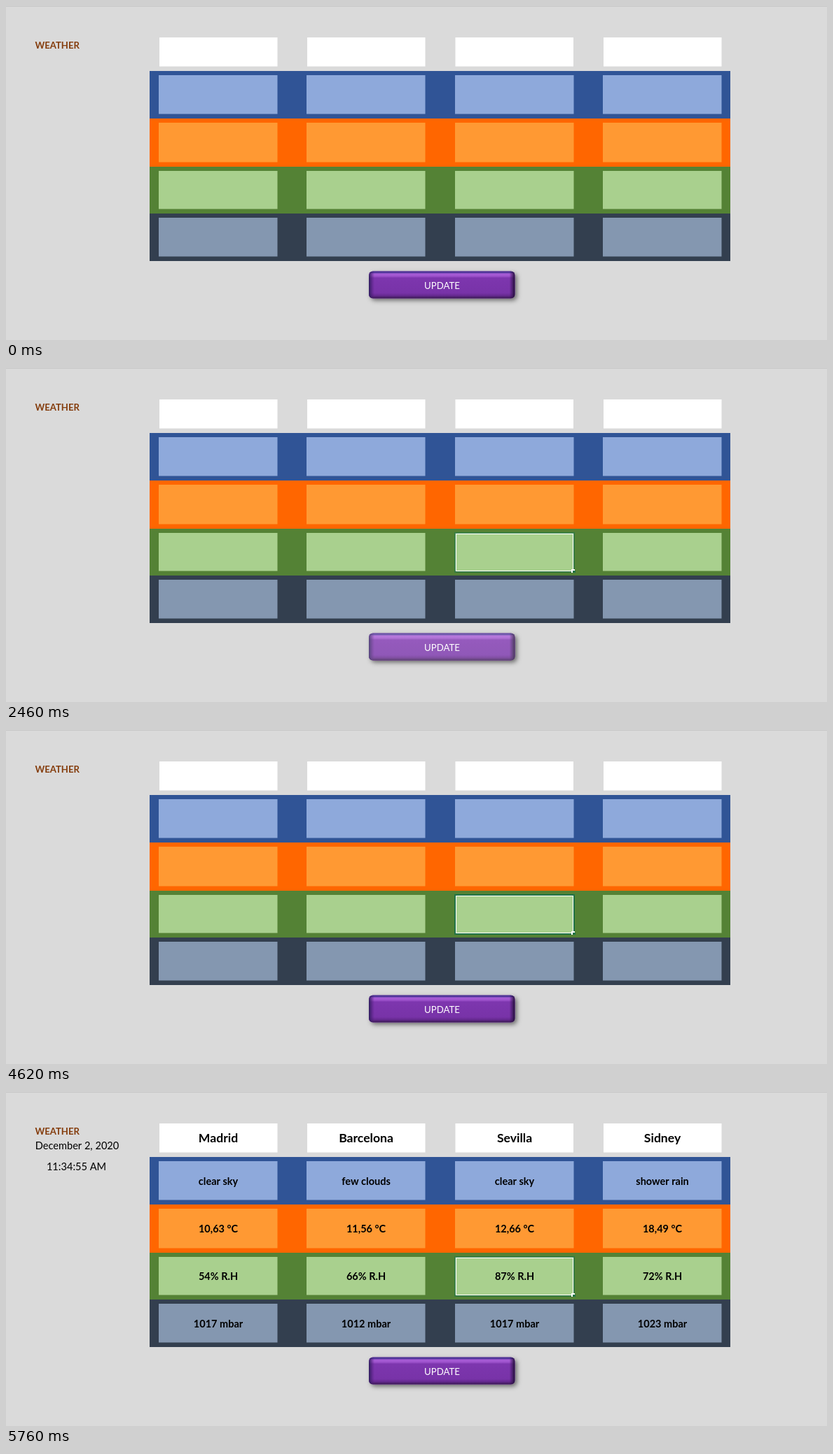
Recreate the animation shown at these times as an HTML page with a canvas. Size 1172x478 px, loop 7770 ms.

```html
<!DOCTYPE html>
<html lang="en">
<head>
<meta charset="utf-8">
<title>Weather sheet</title>
<style>
html, body { margin: 0; width: 100%; height: 100%; overflow: hidden; background: #dadada; }
canvas { display: block; width: 1172px; height: 478px; }
</style>
</head>
<body>
<canvas id="stage" width="1172" height="478"></canvas>
<script>
const ctx = document.getElementById('stage').getContext('2d');
const W = 1172, H = 478, LOOP = 7770;
const GREEN = '#217346';

const cities = [
  { name: 'Madrid', lat: '40,41670', lon: '-3,70325', values: ['clear sky', '10,63 °C', '54% R.H', '1017 mbar'] },
  { name: 'Barcelona', lat: '41,38879', lon: '2,15899', values: ['few clouds', '11,56 °C', '66% R.H', '1012 mbar'] },
  { name: 'Sevilla', lat: '37,38283', lon: '-5,97317', values: ['clear sky', '12,66 °C', '87% R.H', '1017 mbar'] },
  { name: 'Sidney', lat: '-33,86670', lon: '151,20000', values: ['shower rain', '18,49 °C', '72% R.H', '1023 mbar'] }
];
const bands = [
  { top: 93, bottom: 161, outer: '#305496', inner: '#8ea9db' },
  { top: 161, bottom: 230, outer: '#ff6600', inner: '#ff9933' },
  { top: 230, bottom: 297, outer: '#548235', inner: '#a9d08e' },
  { top: 297, bottom: 365, outer: '#333f4f', inner: '#8497b0' }
];
const cellLeft = [218, 429, 641, 852];

function box(x, y, w, h, color) {
  ctx.fillStyle = color;
  ctx.fillRect(x, y, w, h);
}

function label(text, x, y, size, { bold = false, color = '#000', align = 'center' } = {}) {
  ctx.font = `${bold ? 700 : 400} ${size}px Lato, Carlito, sans-serif`;
  ctx.textAlign = align;
  ctx.fillStyle = color;
  ctx.fillText(text, x, y);
}

function withAlpha(alpha, draw) {
  ctx.save();
  ctx.globalAlpha = alpha;
  draw();
  ctx.restore();
}

function gradient(x0, y0, x1, y1, stops) {
  const g = ctx.createLinearGradient(x0, y0, x1, y1);
  stops.forEach(([at, color]) => g.addColorStop(at, color));
  return g;
}

function drawButton(faded) {
  const x = 518, y = 379.5, w = 208.5, h = 39;
  ctx.save();
  ctx.beginPath();
  ctx.roundRect(x, y, w, h, 6);
  ctx.save();
  ctx.shadowColor = 'rgba(0,0,0,.5)';
  ctx.shadowBlur = 6;
  ctx.shadowOffsetX = ctx.shadowOffsetY = 3;
  ctx.fillStyle = '#7a34aa';
  ctx.fill();
  ctx.restore();
  ctx.clip();
  box(x, y, w, h, gradient(0, y, 0, y + h, [
    [0, '#41378f'], [.05, '#53369c'], [.1, '#a55bd4'], [.17, '#a256d0'],
    [.25, '#7d36ae'], [.8, '#7833a8'], [.9, '#65298f'], [1, '#37184f']
  ]));
  box(x, y, 8, h, gradient(x, 0, x + 8, 0, [[0, 'rgba(35,25,85,.9)'], [.4, 'rgba(60,28,105,.6)'], [1, 'rgba(80,30,120,0)']]));
  box(x + w - 8, y, 8, h, gradient(x + w - 8, 0, x + w, 0, [[0, 'rgba(50,18,75,0)'], [.6, 'rgba(45,18,70,.65)'], [1, 'rgba(25,12,45,.95)']]));
  if (faded) box(x, y, w, h, 'rgba(255,255,255,.18)');
  ctx.restore();
  label('UPDATE', 622.5, 404.5, 13.2, { color: '#fff' });
}

function drawCellFocus(strength) {
  withAlpha(strength, () => {
    ctx.strokeStyle = GREEN;
    ctx.lineWidth = 2;
    ctx.strokeRect(641, 236, 170, 56);
  });
  ctx.strokeStyle = '#fff';
  ctx.lineWidth = 1;
  ctx.strokeRect(642.5, 237.5, 167, 53);
  box(807, 288, 5, 5, '#fff');
  box(809, 290, 4, 3, GREEN);
}

function drawReadings() {
  label('December 2, 2020', 101.5, 82, 14.6);
  label('11:34:55 AM', 100.5, 112, 14.6);
  cities.forEach((city, col) => {
    const x = cellLeft[col] + 85;
    label(city.name, x, 72, 17.6, { bold: true });
    city.values.forEach((value, row) => label(value, x, 132.5 + row * 68, 14.5, { bold: true }));
  });
}

function drawDashboard(t) {
  box(0, 0, W, H, '#dadada');
  box(0, 0, W, 1, '#c8c8c8');
  label('WEATHER', 41.5, 61, 13.1, { bold: true, color: '#843c0c', align: 'left' });
  cellLeft.forEach((x, i) => box(i === 2 ? x + .5 : x + 1, 45, 168.5, 41.5, '#fff'));
  for (const { top, bottom, outer, inner } of bands) {
    box(205, top, 829, bottom - top, outer);
    cellLeft.forEach(x => box(x, top + 6, 169.5, bottom - top - 12.5, inner));
  }
  const leaving = t >= 2460 && t < 2490;
  if (t >= 1770) drawCellFocus(leaving || t >= 5400 ? .6 : 1);
  drawButton(leaving);
  if (t >= 5400) withAlpha(Math.min(1, (t - 5364) / 396), drawReadings);
}

function drawSheet(t) {
  box(0, 0, W, H, '#fff');
  const lineColor = '#d4d4d4';
  box(0, 0, W, 1, lineColor);
  for (let i = 0; i < 12; i++) box(0, Math.round(33.2 + i * 37.7), W, 1, lineColor);
  [238, 412, 562, 713, 864, 1015, 1165].forEach(x => box(x, 0, 1, H, lineColor));
  box(0, 0, 563, 33.5, '#ffc000');
  box(0, 0, 563, 1, '#efb400');
  box(0, 33.5, 563, 151, '#bdd7ee');

  const bold = { bold: true };
  label('City', 117.5, 25, 25.3, bold);
  label('Latitude', 325.5, 25, 25.3, bold);
  label('Longitude', 488, 25, 25.3, bold);
  cities.forEach(({ name, lat, lon }, i) => {
    const y = 62.5 + i * 37.7;
    label(name, 0, y, 25.3, { bold: true, align: 'left' });
    label(lat, 325.7, y, 24);
    label(lon, lon[0] === '2' ? 481.5 : 488, y, 24);
  });

  withAlpha(t >= 4590 ? .75 : 1, () => {
    ctx.strokeStyle = GREEN;
    ctx.lineWidth = 2;
    ctx.strokeRect(563, 372.5, 151, 38.5);
    box(710, 407, 6, 6, '#fff');
    box(711, 408, 5, 5, GREEN);
  });
}

function frame(now) {
  const t = now % LOOP;
  if (t >= 2490 && t < 4620) drawSheet(t);
  else drawDashboard(t);
  requestAnimationFrame(frame);
}
requestAnimationFrame(frame);
</script>
</body>
</html>
```
